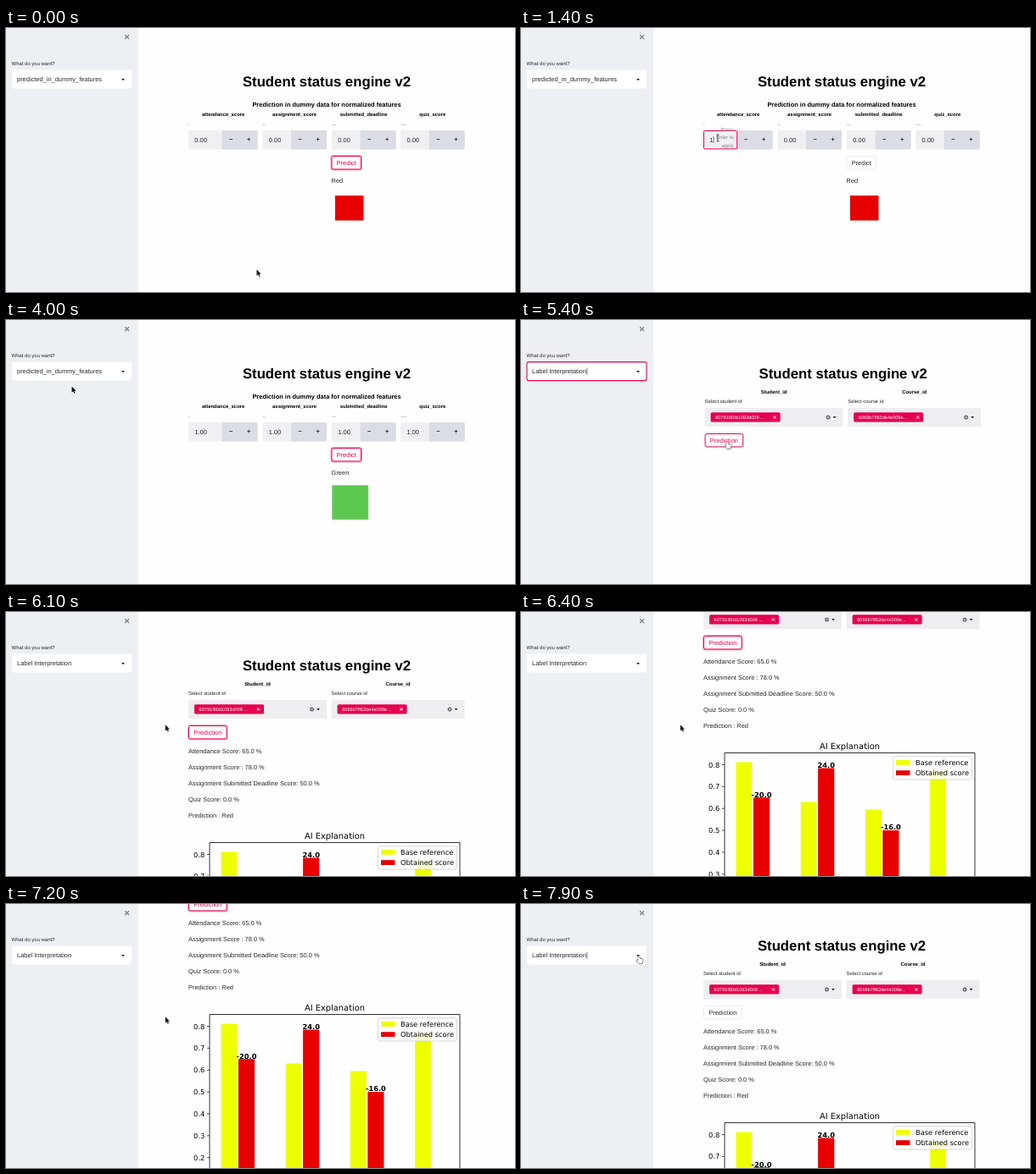
These frames come from a looping animation (600 px wide and 312 px high, 8000 ms). An HTML page with a canvas:

```html
<!DOCTYPE html>
<html lang="en">
<head>
<meta charset="utf-8">
<title>Student status engine</title>
<style>
html, body { margin: 0; width: 100%; height: 100%; overflow: hidden; background: #fefefe; }
canvas { display: block; width: 600px; height: 312px; }
</style>
</head>
<body>
<canvas id="stage"></canvas>
<script>
const canvas = document.getElementById('stage');
const dpr = window.devicePixelRatio || 1;
canvas.width = 600 * dpr;
canvas.height = 312 * dpr;
const ctx = canvas.getContext('2d');

const LOOP = 8000, STEP = 100;
const SANS = '"Liberation Sans", Arial, sans-serif';
const PLOT = '"DejaVu Sans", sans-serif';
const INK = '#262730', PINK = '#e6004f', FIELD = '#f0f0f3', SHADE = '#dcdce5';
const RED = '#e60000', YELLOW = '#eeff00';
const BODY = 7.45, SMALL = 5.95;

// Column geometry and the times at which each field is focused, typed and applied.
const columns = [
  { name: 'attendance_score', x: 215, w: 81.7, focus: 800, typed: 1200, done: 1500 },
  { name: 'assignment_score', x: 302.5, w: 75.6, focus: 1800, typed: 2000, done: 2200 },
  { name: 'submitted_deadline', x: 384, w: 75.6, focus: 2300, typed: 2400, done: 2700 },
  { name: 'quiz_score', x: 465.2, w: 75.6, focus: 2900, typed: 3100, done: 3400 }
];
const pointerPath = [
  [0, 295.5, 285.5], [100, 295.5, 285.5], [700, 232, 130], [1500, 232, 130],
  [1800, 318, 130], [2100, 318, 130], [2300, 398, 130], [2500, 423, 128],
  [2700, 423, 128], [2900, 482, 130], [3200, 482, 130], [3500, 400, 158],
  [3700, 400, 158], [4000, 77.5, 78.5], [4200, 110, 60], [4400, 110, 60],
  [4600, 60, 98], [4800, 60, 98], [5300, 243, 143], [5700, 243, 143],
  [6000, 187.8, 133.3], [7500, 187.8, 133.3], [7900, 139, 61]
];
const pointerKinds = [
  [0, 'arrow'], [700, 'beam'], [1600, 'arrow'], [1800, 'beam'], [2500, 'hand'],
  [2800, 'beam'], [3300, 'arrow'], [3500, 'hand'], [3800, 'arrow'], [4200, 'hand'],
  [4900, 'arrow'], [5300, 'hand'], [5800, 'arrow'], [7800, 'hand']
];
const scrollPath = [[0, 0], [6100, 0], [6400, 106], [6800, 230], [6900, 230],
  [7200, 142], [7600, 14]];
const chartBars = [[0.812, 0.65, '-20.0'], [0.63, 0.785, '24.0'],
  [0.595, 0.5, '-16.0'], [0.77, 0, '-100.0']];
const chartNames = ['attendance', 'assignment', 'deadline', 'quiz'];

const within = (t, a, b) => t >= a && t < b;

function follow(path, t) {
  const i = path.findIndex(p => p[0] > t);
  if (i < 0) return path[path.length - 1].slice(1);
  const a = path[i - 1], b = path[i];
  const k = (t - a[0]) / (b[0] - a[0]);
  return a.slice(1).map((v, n) => v + (b[n + 1] - v) * k);
}

function text(str, x, y, { size = BODY, color = INK, bold = false, align = 'left', font = SANS } = {}) {
  ctx.font = `${bold ? 'bold ' : ''}${size}px ${font}`;
  ctx.textAlign = align;
  ctx.fillStyle = color;
  ctx.fillText(str, x, y);
}

function box(x, y, w, h, fill, stroke, radius = 0, line = 1) {
  ctx.beginPath();
  ctx.roundRect(x, y, w, h, radius);
  if (fill) { ctx.fillStyle = fill; ctx.fill(); }
  if (stroke) { ctx.strokeStyle = stroke; ctx.lineWidth = line; ctx.stroke(); }
}

function line(color, width, ...pts) {
  ctx.beginPath();
  pts.forEach(p => ctx.lineTo(...p));
  ctx.strokeStyle = color;
  ctx.lineWidth = width;
  ctx.stroke();
}

function cross(x, y, r, color, width) {
  line(color, width, [x - r, y - r], [x + r, y + r]);
  line(color, width, [x - r, y + r], [x + r, y - r]);
}

function triangle(x, y) {
  ctx.beginPath();
  ctx.moveTo(x - 2, y - 1);
  ctx.lineTo(x + 2, y - 1);
  ctx.lineTo(x, y + 1.2);
  ctx.fillStyle = INK;
  ctx.fill();
}

// mode: 0 plain, 1 hovered, 2 focused
function button(label, x, y, w, mode) {
  if (mode === 2) box(x + .5, y + .5, w - 1, 15.4, null, 'rgba(230,0,79,.35)', 2, 3);
  box(x + .5, y + .5, w - 1, 15.4, '#fff', mode ? PINK : '#e6e6ea', 2, mode ? 1 : .7);
  text(label, x + w / 2, y + 10.9, { align: 'center', color: mode ? PINK : INK });
}

function heading() {
  text('Student status engine v2', 378, 69, { size: 16.75, bold: true, align: 'center', color: '#000' });
}

function numberField(col, i, t) {
  const { x, w } = col, split = x + w - 42, mid = x + w - 21;
  const hover = i === 2 && within(t, 2500, 2800);
  const typing = within(t, col.typed, col.done);
  text(col.name, x + w / 2 + (i ? -.2 : .3), 103.6,
    { size: SMALL, bold: true, align: 'center', color: '#000' });
  text('.'.repeat(i + 1), x, 114.6, { size: SMALL });
  box(x, 121, w, 22.4, FIELD, null, 1.5);
  box(split, 121, 42, 22.4, SHADE, null, [0, 1.5, 1.5, 0]);
  if (hover) box(split, 121, 21, 22.4, PINK);
  text('−', split + 10.5, 134.4, { bold: true, align: 'center', color: hover ? '#fff' : INK });
  text('+', mid + 10.5, 134.4, { bold: true, align: 'center' });
  text(t < col.typed ? '0.00' : typing ? '1' : '1.00', x + 7.3, 134.5);
  if (within(t, col.focus, col.done)) {
    box(x + .5, 121.5, w - 42.5, 21.4, null, PINK, 1);
    if (typing) line(INK, .6, [x + 12, 128], [x + 12, 136]);
  }
  if (typing) ['Press', 'Enter to', 'apply'].forEach((s, n) =>
    text(s, split - 4, 122 + n * 9.4, { size: SMALL, align: 'right', color: '#85868d' }));
}

function dummyPage(t) {
  const idle = within(t, 1500, 3700);
  ctx.translate(idle ? 1.6 : 0, 0);
  heading();
  text('Prediction in dummy data for normalized features', 378, 93,
    { bold: true, align: 'center', color: '#000' });
  columns.forEach((c, i) => numberField(c, i, t));
  const focused = t < 800 || within(t, 3600, 4200);
  button('Predict', 383.5, 151, 35.5, focused ? 2 : t === 3500 ? 1 : 0);
  if (idle) return;
  text(t < 1500 ? 'Red' : 'Green', 383.6, 183.2);
  if (t < 1500) box(388, 198, 33.5, 29.6, RED);
  else if (t >= 3800) box(384.6, 195.5, 42.3, 40.3, '#5dc84f', '#70c464', 0, .5);
}

function tagField(title, label, tag, x, w) {
  text(title, x + w / 2, 87.3, { size: SMALL, bold: true, align: 'center', color: '#000' });
  text(label, x, 98.4, { size: SMALL });
  box(x, 104, w, 22.2, '#eeeef1', null, 1.5);
  box(x + 7, 109.2, 82, 11.4, PINK, null, 1.5);
  text(tag, x + 12.6, 116.6, { size: 5.6, color: '#fff' });
  cross(x + 82.5, 115, 1.6, '#fff', 1);
  ctx.beginPath();
  ctx.arc(x + w - 17.5, 115, 2.5, 0, 7);
  ctx.fillStyle = '#70717a';
  ctx.fill();
  cross(x + w - 17.5, 115, .9, '#eeeef1', .6);
  triangle(x + w - 10, 115);
}

function chart() {
  const plot = { font: PLOT, size: 8.3, color: '#000' };
  const level = v => 493.3 - v * 258.5;
  text('AI Explanation', 387.5, 267.6, { ...plot, size: 9.9, align: 'center' });
  chartBars.forEach(([base, score, label], i) => {
    const x = 253.5 + i * 76.2;
    box(x, level(base), 18.8, base * 258.5, YELLOW);
    box(x + 20.4, level(score), 19.2, score * 258.5, RED);
    text(label, x + 30, level(score) - .6, { ...plot, bold: true, align: 'center' });
    text(chartNames[i], x + 19.8, 506, { ...plot, align: 'center' });
    line('#000', .7, [x + 19.8, 493.3], [x + 19.8, 496.2]);
  });
  for (let i = 0; i < 9; i++) {
    const y = level(i / 10);
    line('#000', .7, [237, y], [240, y]);
    text((i / 10).toFixed(1), 234.3, y + 3.1, { ...plot, align: 'right' });
  }
  box(240, 272.5, 295, 220.8, null, '#000', 0, .8);
  box(438.7, 276.8, 92.6, 27.2, 'rgba(255,255,255,.8)', '#ccc', 1.6, .8);
  [['Base reference', YELLOW], ['Obtained score', RED]].forEach(([s, c], i) => {
    box(442, 281 + i * 12.2, 16.5, 5.8, c);
    text(s, 465, 286.8 + i * 12.3, plot);
  });
}

function labelPage(t) {
  const ready = t >= 5900;
  ctx.translate(ready ? 0 : 1.6, -follow(scrollPath, t)[0]);
  heading();
  tagField('Student_id', 'Select student id', '60791f80d1093d009 ...', 215, 163);
  tagField('Course_id', 'Select course id', '6066b7ff62de4e009e...', 383.6, 157);
  button('Prediction', 215, 134, 45.6, within(t, 5600, 7900) ? 2 : within(t, 5300, 5600) ? 1 : 0);
  if (!ready) return;
  ['Attendance Score: 65.0 %', 'Assignment Score : 78.0 %',
    'Assignment Submitted Deadline Score: 50.0 %', 'Quiz Score: 0.0 %', 'Prediction : Red'
  ].forEach((s, i) => text(s, 215, 166.6 + i * 19.1));
  chart();
}

function sidebar(t) {
  const open = within(t, 4400, 4800);
  const choice = t < 4800 ? 'predicted_in_dummy_features' : 'Label Interpretation';
  box(0, 0, 156, 312, '#eeeff3');
  cross(142.6, 10.7, 2.4, '#85868c', 1.4);
  text('What do you want?', 6.6, 43.6, { size: SMALL });
  const focused = within(t, 4200, 5600);
  box(7, 49.6, 141, 22, '#fff', focused ? PINK : null, 2, 1.1);
  text(choice, 13, 63.2);
  if (within(t, 4800, 5600) || t >= 7900) {
    const end = 13.8 + ctx.measureText(choice).width;
    line(INK, .6, [end, 56.5], [end, 65]);
  }
  triangle(138, 61);
  if (!open) return;
  ctx.save();
  ctx.shadowColor = 'rgba(0,0,0,.16)';
  ctx.shadowBlur = 6 * dpr;
  ctx.shadowOffsetY = 2 * dpr;
  box(7, 73, 141, 43, '#fff', null, 2);
  ctx.restore();
  box(7, t < 4600 ? 75.5 : 94.5, 141, 19, FIELD);
  text('predicted_in_dummy_features', 14.5, 87.6);
  text('Label Interpretation', 14.5, 106.6);
}

function pointer(t) {
  const kind = pointerKinds.filter(k => k[0] <= t).pop()[1];
  ctx.translate(...follow(pointerPath, t));
  ctx.lineJoin = 'round';
  if (kind === 'beam') {
    line('#222', .8, [0, -4], [0, 4]);
    line('#222', .7, [-1.5, -4], [1.5, -4]);
    line('#222', .7, [-1.5, 4], [1.5, 4]);
    return;
  }
  const shape = new Path2D(kind === 'arrow'
    ? 'M0 0V7.2L1.7 5.7L2.9 8.3L4.1 7.7L3 5.2H5.2Z'
    : 'M-.8 .8Q0 -.4.8 .8V3.2L4 4Q5 4.3 4.8 5.5L4 9H-.4L-3 5.6Q-2.6 4.4 -.8 5.8Z');
  ctx.strokeStyle = kind === 'arrow' ? '#fff' : '#111';
  ctx.lineWidth = kind === 'arrow' ? 1.2 : 1;
  ctx.stroke(shape);
  ctx.fillStyle = kind === 'arrow' ? '#111' : '#fff';
  ctx.fill(shape);
}

function layer(draw, t) {
  ctx.save();
  draw(t);
  ctx.restore();
}

function render(now) {
  const t = Math.floor((now % LOOP) / STEP) * STEP;
  ctx.setTransform(dpr, 0, 0, dpr, 0, 0);
  ctx.textRendering = 'geometricPrecision';
  box(0, 0, 600, 312, '#fefefe');
  layer(t < 4800 ? dummyPage : labelPage, t);
  layer(sidebar, t);
  layer(pointer, t);
}

const start = performance.now();
function tick() {
  render(performance.now() - start);
  requestAnimationFrame(tick);
}
tick();
</script>
</body>
</html>
```
